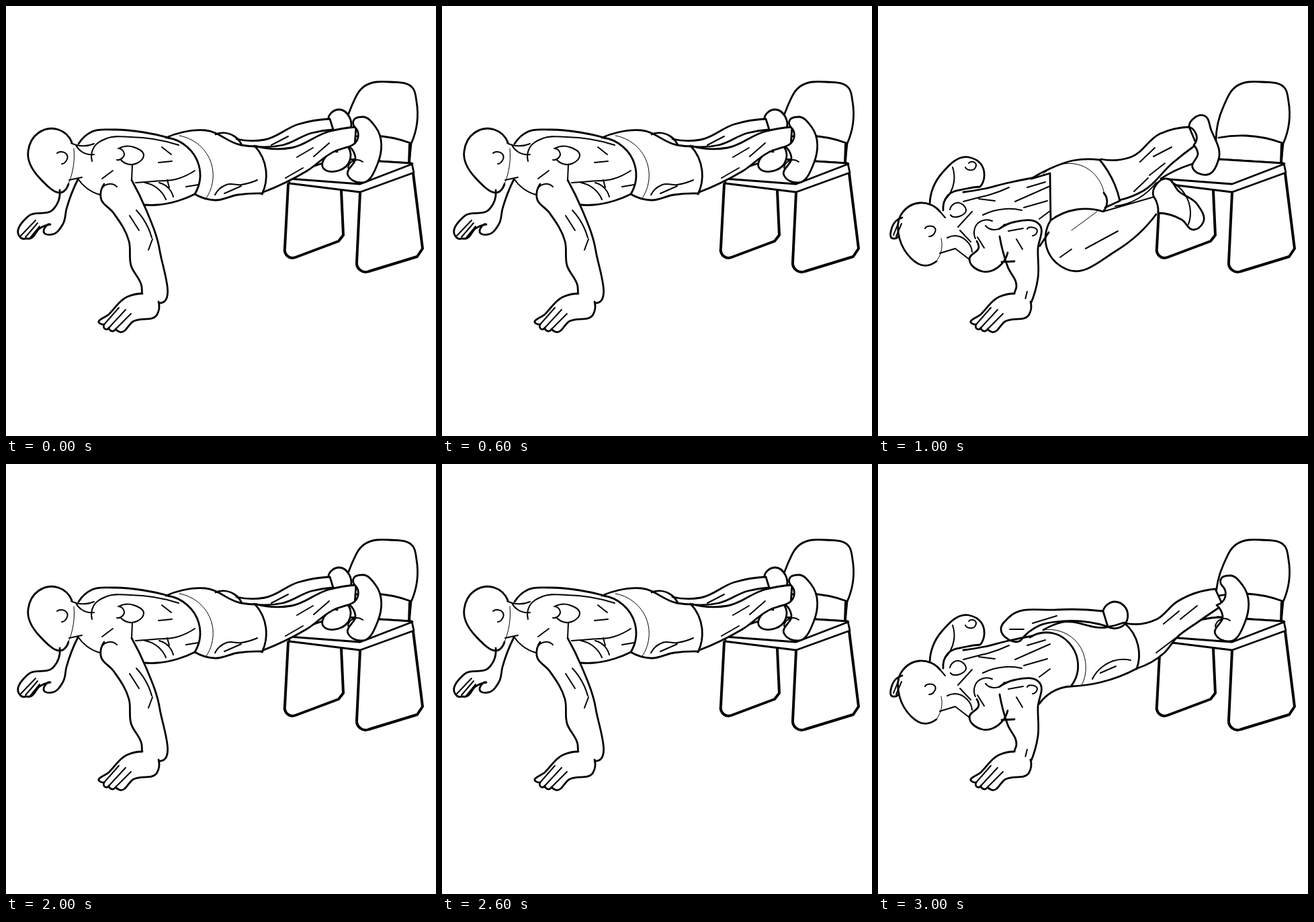
These frames come from a looping animation (640 by 640 pixels, 4000 ms). An HTML page with a canvas:

```html
<!DOCTYPE html>
<html lang="en">
<head>
<meta charset="utf-8">
<title>Push-up with raised feet</title>
<style>
  html, body { margin: 0; width: 100%; height: 100%; overflow: hidden; background: #fff; }
  canvas { display: block; width: 100vmin; height: 100vmin; }
</style>
</head>
<body>
<canvas id="stage" width="640" height="640"></canvas>
<script>
const canvas = document.getElementById('stage');
const ctx = canvas.getContext('2d');
const HOLD = 1000;
const FINE = 1, THIN = 2, BOLD = 2.8, HEAVY = 4;

const angle = (p, q) => Math.atan2(q[1] - p[1], q[0] - p[0]);

// Each point takes the tangent of the circle through it and its neighbours.
function tangents(pts) {
  const end = pts.length - 1;
  if (end === 1) return [angle(...pts), angle(...pts)];
  const dirs = pts.map((p, i) => i > 0 && i < end
    ? angle(pts[i - 1], p) + angle(p, pts[i + 1]) - angle(pts[i - 1], pts[i + 1]) : 0);
  dirs[0] = 2 * angle(pts[0], pts[1]) - dirs[1];
  dirs[end] = 2 * angle(pts[end - 1], pts[end]) - dirs[end - 1];
  return dirs;
}

// Smooth curves through points; "/" makes a corner, ";" starts a new stroke.
function trace(text) {
  const path = new Path2D();
  for (const stroke of text.split(';')) {
    let last = null;
    for (const piece of stroke.split('/')) {
      const pts = piece.trim().split(/\s+/).map(p => p.split(',').map(Number));
      if (last) pts.unshift(last);
      else path.moveTo(...pts[0]);
      last = pts[pts.length - 1];
      if (pts.length < 2) continue;
      const dirs = tangents(pts);
      for (let i = 1; i < pts.length; i++) {
        const [ax, ay] = pts[i - 1], [bx, by] = pts[i];
        const k = Math.hypot(bx - ax, by - ay) * 0.35;
        path.bezierCurveTo(
          ax + k * Math.cos(dirs[i - 1]), ay + k * Math.sin(dirs[i - 1]),
          bx - k * Math.cos(dirs[i]), by - k * Math.sin(dirs[i]), bx, by);
      }
    }
  }
  return path;
}

function line(width, text) {
  ctx.lineWidth = width;
  ctx.stroke(trace(text));
}

function shape(text) {
  ctx.fill(trace(text));
  line(BOLD, text);
}

function chair() {
  shape('503,200 514,150 534,119 571,113 606,123 611,142 603,205 / 600,234 / 505,228');
  line(HEAVY, '601,206 600,234');
  line(BOLD, '507,196 548,193 602,204');
  line(HEAVY, '420,265 / 415,360 / 420,373 431,374 / 495,350 / 502,341 / 499,275');
  line(HEAVY, '527,278 / 522,382 / 527,393 540,395 / 612,373 / 620,361 / 606,249');
  shape('421,257 465,236 507,228 / 604,234 / 607,248 / 527,277 / 422,264 / 421,257 / 527,265 / 605,235');
}

function nearHand() {
  shape('203,428 180,433 153,459 139,472 146,474 / 148,481 153,479 / 159,484 163,481 / 169,485 190,469 225,459 227,440');
  line(THIN, '146,474 168,449; 153,479 178,452; 163,481 186,458');
}

function nearFoot() {
  shape('519,180 517,171 531,165 550,180 553,235 530,263 509,252 520,225 511,209 / 524,196 519,180');
  line(THIN, '509,241 518,230 531,232');
}

function upperBodyHigh() {
  // far arm
  shape('107,258 90,302 85,324 68,340 57,338 66,325 / 50,331 36,346 30,346 / 22,345 19,341 33,313 70,303 80,274');
  line(THIN, '22,342 44,319; 29,344 47,323; 36,345 50,328');

  // torso
  line(BOLD, '108,205 128,187 160,184 205,188 242,196; 207,296 225,296 256,290 281,280');
  line(THIN, '97,204 105,207 131,205; 104,207 113,217 131,221; 94,259 113,255; 107,257 120,271 140,281');
  line(THIN, '128,231 131,210 150,197 185,195 257,207; 168,212 190,210 205,222 195,234 171,229; 167,212 176,220 165,229');
  line(THIN, '232,210 246,221; 227,233 247,231; 143,257 159,245; 188,236 187,259');
  line(THIN, '193,263 220,261 256,257 281,245; 207,263 225,271 238,288; 228,263 245,275 249,284; 240,259 243,270; 268,269 286,266');

  // near arm
  shape('146,265 141,285 160,308 183,350 186,386 202,418 202,431 / 227,442 229,365 208,302 187,259');
  line(THIN, '143,271 153,265 165,269; 194,304 212,331 217,345; 184,312 198,334; 212,363 218,347');
  nearHand();

  // head
  line(BOLD, '98,203 78,184 48,189 33,216 50,256 87,275 93,265');
  line(FINE, '92,267 100,240 101,212');
  line(THIN, '76,219 91,222 83,235');
}

function legsHigh() {
  shape('480,166 496,154 511,165 512,185 / 487,184 480,166');
  shape('343,198 385,199 435,176 482,168 / 487,184 / 455,189 412,207 370,209');
  line(THIN, '395,207 420,194');
  shape('493,217 472,241 495,245 512,229 510,211');

  shape('373,209 425,211 480,187 521,180 / 519,208 / 492,215 447,246 383,277');
  line(THIN, '433,225 457,211; 458,224 481,204; 416,256 442,241');
  nearFoot();

  // shorts
  line(BOLD, '238,196 262,188 297,185 350,207 374,209; 312,191 340,194 351,207; 370,208 387,245 381,280');
  line(BOLD, '240,196 287,237 281,280 / 311,289 345,281 382,279');
  line(FINE, '258,193 304,230 298,286');
  line(THIN, '311,281 328,266 350,266 374,259; 325,279 350,268');
}

function upperBodyLow() {
  // far arm
  line(BOLD, '36,315 21,329 22,346 31,342');
  line(THIN, '31,321 23,341; 35,324 27,343');
  shape('77,295 95,249 135,225 153,235 152,269 / 131,272 104,282 97,304');
  line(THIN, '111,240 113,262 99,289; 130,240 144,242 145,234 135,234');

  // back and shoulders
  line(BOLD, '127,277 158,272 190,264 229,256');
  line(THIN, '107,303 117,293 131,303 108,311; 127,291 150,285 166,281 195,270; 119,329 140,306; 150,287 174,290');
  line(THIN, '156,311 190,302 214,304; 204,291 256,268; 222,270 249,262; 217,300 252,290; 240,317 256,305');
  line(THIN, '145,346 149,323 170,320; 160,327 172,333 188,325; 122,334 138,351; 148,344 158,360');
  line(THIN, '92,368 115,361 / 137,378; 103,345 114,342 140,366');

  // near arm
  shape('180,332 205,321 240,325 238,362 238,405 227,444 / 203,429 206,418 193,388 181,343');
  line(THIN, '222,332 237,335 230,342; 206,347 215,362; 194,335 216,331; 219,437 222,425');
  line(BOLD, '147,350 150,358 136,377 155,395 184,384 193,367; 184,381 203,380');
  nearHand();

  // head
  line(BOLD, '92,306 62,293 36,308 32,346 78,385 87,380');
  line(FINE, '86,381 95,358 94,346');
  line(THIN, '70,331 85,331 76,343; 88,301 100,315');
}

function kneeIn() {
  // far leg
  shape('332,228 376,225 420,190 463,180 / 474,206 / 438,234 395,275 359,289');
  line(THIN, '390,232 412,211; 410,224 437,210; 404,252 427,234; 381,276 402,256');
  shape('463,180 485,163 496,185 507,228 490,251 468,240 476,219 470,207 / 474,200 463,180');

  // near leg
  line(BOLD, '257,319 253,365 281,392 355,364 414,310');
  line(THIN, '335,306 411,284; 271,374 288,362; 309,361 357,335; 353,298 388,286 414,263');
  line(FINE, '288,334 326,306');
  shape('410,283 430,257 448,276 475,295 484,322 470,333 452,318 417,308 / 416,296 410,283');
  line(THIN, '437,262 465,306 462,325');

  // shorts
  line(BOLD, '228,257 256,242 290,230 330,229 / 352,265 360,290 / 338,300');
  line(BOLD, '229,257 256,249 / 257,319 / 295,303 335,306 / 340,285 336,278');
  line(FINE, '246,250 304,238 337,282');
  line(BOLD, '241,357 254,337');
}

function kneeOut() {
  // far leg swung to the side
  shape('335,219 352,205 367,212 369,236 / 342,242 335,219');
  shape('212,263 183,245 195,228 265,217 335,219 / 342,242 / 275,234 241,240 212,263');
  line(THIN, '196,246 217,246; 230,237 266,226');

  // near leg
  shape('368,237 415,231 445,205 502,186 / 513,210 / 475,236 446,257 425,282 386,304');
  line(THIN, '425,238 448,219; 450,231 475,211; 414,281 443,259');
  ctx.save();
  ctx.translate(-7, 1);
  nearFoot();
  ctx.restore();

  // shorts
  line(BOLD, '246,247 272,236 340,243 366,236 / 387,270 385,305');
  line(BOLD, '226,258 261,252 297,292 287,331 / 331,325 386,304; 240,357 258,340 287,331');
  line(FINE, '246,247 292,261 303,329');
  line(THIN, '319,320 335,301 376,292; 331,311 354,301');
}

function high() {
  legsHigh();
  upperBodyHigh();
}

const poses = [
  high,
  () => { kneeIn(); upperBodyLow(); },
  high,
  () => { kneeOut(); upperBodyLow(); }
];

const start = performance.now();
let shown = -1;

function tick() {
  const step = Math.floor((performance.now() - start) / HOLD) % poses.length;
  if (step !== shown) {
    shown = step;
    ctx.fillStyle = '#fff';
    ctx.fillRect(0, 0, canvas.width, canvas.height);
    ctx.lineCap = ctx.lineJoin = 'round';
    chair();
    poses[step]();
  }
  requestAnimationFrame(tick);
}
tick();
</script>
</body>
</html>
```
